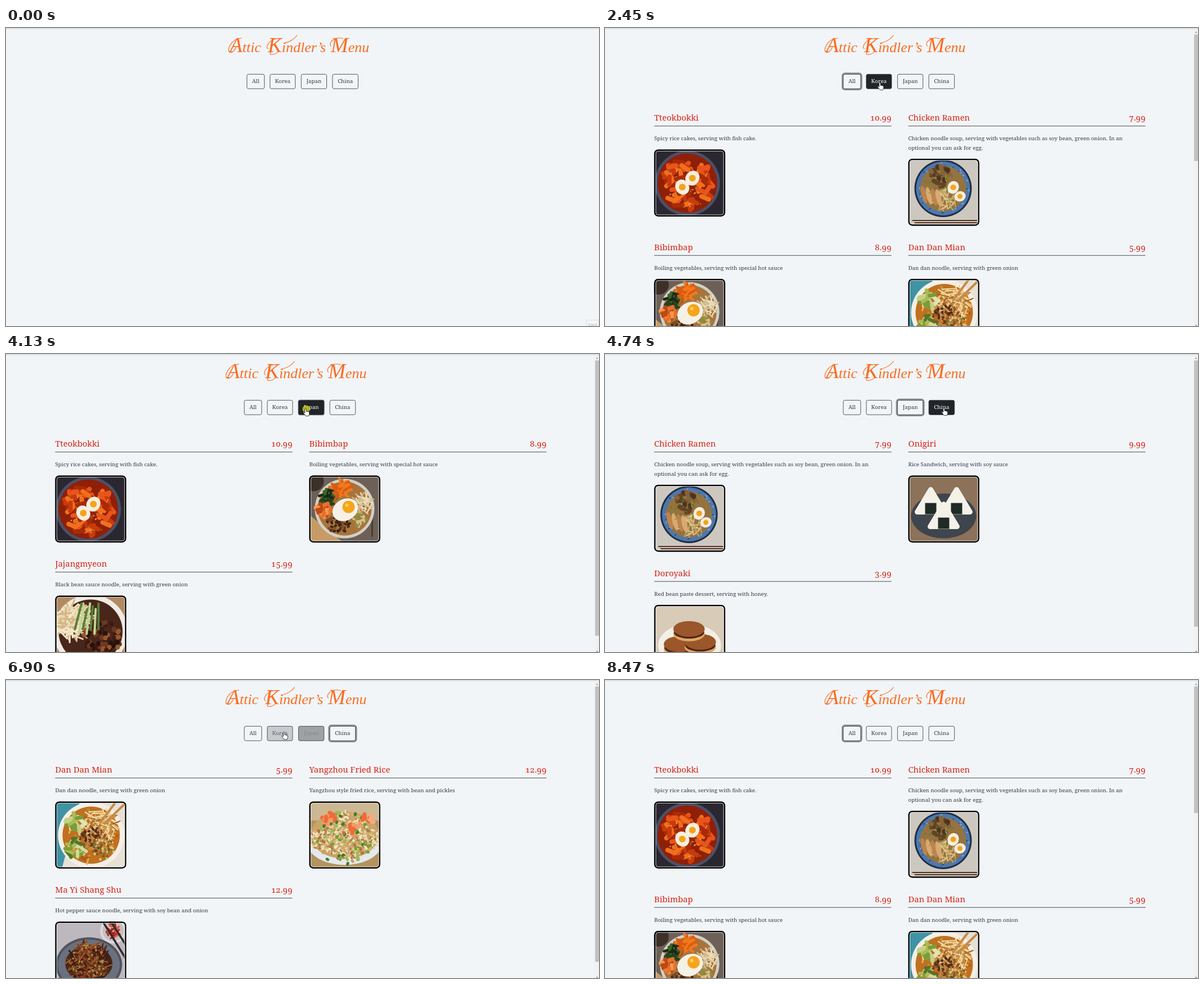
An HTML page that plays this animation: 1055x531 px, repeating every 9.4 s.

```html
<!DOCTYPE html>
<html lang="en">
<head>
<meta charset="utf-8">
<title>Menu filter</title>
<style>
  html, body { margin: 0; width: 100%; height: 100%; overflow: hidden; background: #f1f5f8; }
  svg { display: block; font-family: "Noto Serif", serif; font-size: 9.78px; fill: #363b40; }
  .title { font: italic 26px "Liberation Serif", serif; fill: #fc6b21; }
  .title .cap { font-size: 37px; }
  .swash { fill: none; stroke: #fc6b21; stroke-width: 1.2; stroke-linecap: round; }
  .name { font-size: 14.8px; fill: #da2013; }
  .price { text-anchor: end; font-variant-numeric: oldstyle-nums tabular-nums; }
  .button text { text-anchor: middle; }
</style>
</head>
<body>
<svg id="stage" width="1055" height="531" viewBox="0 0 1055 531"></svg>
<script>
const LOOP = 9400;
const stage = document.getElementById("stage");

// Shape helpers
let seed = 7;
const random = () => (seed = (seed * 16807) % 2147483647) / 2147483647;
const rect = (x, y, w, h, fill, extra = "") =>
  `<rect x="${x}" y="${y}" width="${w}" height="${h}" fill="${fill}" ${extra}/>`;
const oval = (x, y, rx, ry, fill, turn = 0) =>
  `<ellipse cx="${x}" cy="${y}" rx="${rx}" ry="${ry}" fill="${fill}" transform="rotate(${turn} ${x} ${y})"/>`;
const disc = (x, y, r, fill) => oval(x, y, r, r, fill);
const line = (d, color, width) =>
  `<path d="${d}" fill="none" stroke="${color}" stroke-width="${width}" stroke-linecap="round"/>`;
const egg = (x, y, r, turn = 0) => oval(x, y, r, r * 1.15, "#f8eee0", turn) + disc(x, y, r * .5, "#f3a41b");

// Small rounded pieces strewn over a round area
function bits(count, cx, cy, radius, w, h, colors) {
  let out = "";
  for (let i = 0; i < count; i++) {
    const a = random() * 6.283, d = Math.sqrt(random()) * radius;
    const x = (cx + Math.cos(a) * d).toFixed(1), y = (cy + Math.sin(a) * d).toFixed(1);
    out += rect(-w / 2, -h / 2, w, h, colors[i % colors.length],
      `rx="${Math.min(w, h) / 2}" transform="translate(${x} ${y}) rotate(${(random() * 180) | 0})"`);
  }
  return out;
}
const backdrop = color => rect(0, 0, 126, 119, color);

const photos = {
  tteokbokki: () => backdrop("#2b2730") + disc(59, 60, 58, "#4b5068") + disc(59, 60, 53, "#8f2008") +
    bits(62, 59, 60, 43, 22, 8, ["#e9541a", "#c93a0c", "#f0701e", "#a82a08"]) +
    bits(24, 59, 64, 42, 3, 2, ["#7e8a2c", "#f6a05a"]) + egg(50, 67, 12, -30) + egg(68, 51, 12, 35),
  ramen: () => backdrop("#cdc8bf") + disc(62, 53, 51, "#1f2c44") + disc(62, 53, 48, "#4d78ad") +
    bits(70, 62, 53, 46, 4, 2, ["#2a4c80", "#88a9cc"]) + disc(62, 53, 41, "#94733f") +
    bits(26, 58, 32, 20, 11, 8, ["#644326", "#8a6238", "#4b341f"]) +
    bits(36, 66, 74, 18, 16, 2, ["#dfc68d", "#c7a565"]) +
    [28, 37, 46, 54].map((x, i) => oval(x, 64 + i * 2, 4.5, 16, i % 2 ? "#d8aa72" : "#bd8450", -14)).join("") +
    bits(26, 58, 48, 32, 4, 2, ["#5b7a30", "#89a046"]) + egg(80, 51, 10, 20) + egg(92, 67, 9, 70) +
    line("M8 110H122M12 114H122", "#56301f", 2),
  bibimbap: () => backdrop("#6d6157") + `<path d="M0 70L60 119H0z" fill="#c79b66"/>` + disc(8, 10, 18, "#3c3029") +
    line("M112 44V108", "#4c3b30", 3) + disc(63, 59, 53, "#d2cfc6") + disc(63, 59, 48, "#a7743c") +
    bits(28, 34, 39, 14, 13, 5, ["#26431f", "#3e6128", "#172c17"]) +
    bits(24, 57, 25, 13, 22, 4, ["#f1791d", "#d85b10"]) +
    bits(22, 25, 62, 12, 13, 7, ["#e9702c", "#f39a4b", "#bd4a16"]) +
    bits(70, 52, 84, 20, 6, 4, ["#4a2a17", "#7d4a27", "#33200f"]) +
    bits(26, 96, 52, 14, 24, 2.5, ["#e9dbb7", "#cfb98a"]) +
    bits(22, 90, 80, 12, 8, 4, ["#8a9140", "#d6c08a"]) +
    oval(64, 61, 24, 19, "#f6f1e7", -30) + disc(70, 56, 11, "#f5a51c") + disc(67, 53, 3, "#ffd069"),
  dandan: () => backdrop("#e6e0d5") + `<path d="M0 0H44L12 119H0z" fill="#3f93a4"/>` +
    disc(64, 60, 59, "#f4efe6") + disc(64, 60, 51, "#c0701f") +
    bits(40, 60, 62, 44, 18, 3, ["#d98f3a", "#a95a1a", "#e3ad5c"]) +
    bits(120, 78, 46, 29, 26, 2, ["#edce8c", "#c78f45", "#f4dfab", "#a86a2c"]) +
    bits(20, 37, 38, 15, 16, 7, ["#a8bd55", "#dfe4b4", "#7d9b38", "#c5cf86"]) +
    bits(22, 36, 84, 16, 16, 6, ["#7f9e35", "#d3d99a", "#55752a", "#a9bb58"]) +
    bits(90, 67, 68, 23, 5, 4, ["#6a3a1c", "#925327", "#472713", "#c08a4a"]) +
    bits(40, 86, 84, 20, 5, 4, ["#e1c27d", "#70892f", "#8a5526"]) +
    line("M107 2L80 38M123 5L88 39", "#c78a47", 4),
  yangzhou: () => backdrop("#b3935f") + rect(0, 0, 126, 34, "#cdb894") + oval(63, 71, 68, 42, "#e3e9ee") +
    oval(63, 60, 61, 42, "#c9a56a") +
    bits(420, 63, 61, 43, 6, 3, ["#ead5a5", "#d4b473", "#f5e7c5", "#a98049"]) +
    [18, 108].map(x => bits(90, x, 67, 18, 6, 3, ["#ead5a5", "#d4b473", "#f5e7c5", "#a98049"])).join("") +
    bits(44, 62, 64, 50, 7, 5, ["#6fa535", "#96bd50", "#437c24"]) +
    bits(16, 60, 66, 46, 7, 5, ["#b5723f", "#d99a62"]) +
    bits(9, 36, 33, 12, 15, 7, ["#ef6b38", "#f79a68"]) + bits(7, 79, 44, 9, 15, 7, ["#ef6b38", "#f79a68"]) +
    bits(7, 103, 32, 9, 15, 7, ["#ef6b38", "#f9aa7c"]),
  onigiri: () => backdrop("#8c7259") + oval(63, 72, 58, 40, "#3f454c") +
    [[40, 50], [86, 50], [63, 76]].map(([x, y]) =>
      `<path d="M${x} ${y - 25}l24 40h-48z" fill="#f4f1e8" stroke="#f4f1e8" stroke-width="9" stroke-linejoin="round"/>` +
      rect(x - 10, y - 1, 20, 20, "#202b25")).join(""),
  jajang: () => backdrop("#b28a62") + disc(63, 64, 66, "#f0ebe2") + disc(63, 64, 57, "#49261a") +
    bits(110, 28, 45, 27, 36, 3, ["#e8d5af", "#d2b683", "#f3e7cb"]) +
    bits(80, 84, 75, 33, 9, 8, ["#3b1b12", "#6d3a20", "#26120d", "#99562c"]) +
    [0, 1, 2, 3, 4, 5, 6].map(i => line(`M${47 + i * 5} ${14 + i % 3 * 5}L${35 + i * 7} ${60 + i % 2 * 8}`,
      i % 2 ? "#c5d596" : "#56813a", 4)).join(""),
  mayi: () => backdrop("#bcb8be") + disc(103, 16, 23, "#dcdadc") + disc(103, 16, 19, "#c9bfbf") +
    bits(26, 103, 15, 13, 11, 3, ["#b92a24", "#dc5a40", "#8f1f1c"]) +
    oval(60, 77, 59, 49, "#4e535f") + oval(60, 77, 55, 45, "#6a707e") + oval(60, 75, 42, 32, "#462519") +
    bits(190, 60, 73, 35, 20, 2, ["#6c351c", "#a5612f", "#321a12", "#7e4320"]) +
    bits(50, 60, 70, 32, 4, 3, ["#c58440", "#8a9945", "#a83222"]) +
    line("M86 2L125 65M99 0L126 42", "#33292c", 3.5),
  doroyaki: () => backdrop("#d8cbb8") + oval(63, 72, 56, 38, "#f3efe7") +
    [[45, 72], [82, 68], [62, 45]].map(([x, y]) => oval(x, y + 7, 28, 13, "#dfa75e") +
      oval(x, y + 4, 27, 11, "#4b221c") + oval(x, y - 2, 28, 14, "#9b562a")).join("")
};

const dishes = [
  ["Korea", "Tteokbokki", "10.99", "tteokbokki", "Spicy rice cakes, serving with fish cake."],
  ["Japan", "Chicken Ramen", "7.99", "ramen",
    "Chicken noodle soup, serving with vegetables such as soy bean, green onion. In an", "optional you can ask for egg."],
  ["Korea", "Bibimbap", "8.99", "bibimbap", "Boiling vegetables, serving with special hot sauce"],
  ["China", "Dan Dan Mian", "5.99", "dandan", "Dan dan noodle, serving with green onion"],
  ["China", "Yangzhou Fried Rice", "12.99", "yangzhou", "Yangzhou style fried rice, serving with bean and pickles"],
  ["Japan", "Onigiri", "9.99", "onigiri", "Rice Sandwich, serving with soy sauce"],
  ["Korea", "Jajangmyeon", "15.99", "jajang", "Black bean sauce noodle, serving with green onion"],
  ["China", "Ma Yi Shang Shu", "12.99", "mayi", "Hot pepper sauce noodle, serving with soy bean and onion"],
  ["Japan", "Doroyaki", "3.99", "doroyaki", "Red bean paste dessert, serving with honey."]
];

function dishCard([, name, price, photo, ...text], x, y) {
  const top = 57 + 16.5 * (text.length - 1);
  return `<g transform="translate(${x} ${y})">
    <text class="name" y="5.5">${name}</text><text class="name price" x="422" y="5.5">${price}</text>
    ${rect(0, 14.8, 422, .8, "#212529")}
    ${text.map((s, i) => `<text y="${40.5 + i * 16.5}">${s}</text>`).join("")}
    <g transform="translate(0 ${top})"><use href="#${photo}" clip-path="url(#frame)"/>
    <rect x="1.2" y="1.2" width="124" height="117" rx="6" fill="none" stroke="#000" stroke-width="2.4"/>
    <rect x="2.9" y="2.9" width="120.6" height="113.6" rx="4" fill="none" stroke="#f1f5f8" stroke-width=".8"/></g></g>`;
}

function menu(kind, thumbEnd) {
  const list = dishes.filter(d => kind === "All" || d[0] === kind);
  let out = "", y = 159.5;
  for (let i = 0; i < list.length && y < 531; i += 2) {
    const row = list.slice(i, i + 2);
    row.forEach((d, col) => out += dishCard(d, 87.5 + col * 452, y));
    y += row.some(d => d.length > 5) ? 230.5 : 214;
  }
  return `<g id="menu${kind}">${out}${rect(1048, 2, 7, 529, "#f1f1f1")}
    ${rect(1048, 11.5, 7, thumbEnd - 11.5, "#c1c1c1")}
    <path d="M1049.8 8.5l1.8-2.2 1.8 2.2zM1049.8 529l1.8 2 1.8-2z" fill="#7c7c7c"/></g>`;
}

const buttons = [["All", 428.7, 31], ["Korea", 469.7, 45], ["Japan", 525.2, 45.3], ["China", 580.9, 45.6]];
const box = (x, w, extra) => `<rect x="${x}" y="82.4" width="${w}" height="25.8" rx="2.8" ${extra}/>`;

stage.innerHTML = `
  <defs><clipPath id="frame"><rect width="126" height="119" rx="7"/></clipPath>
  ${Object.entries(photos).map(([id, draw]) => `<g id="${id}">${draw()}</g>`).join("")}</defs>
  ${rect(0, 0, 1055, 531, "#f1f5f8")}${rect(0, .6, 1055, 1, "#c9cccf")}
  ${menu("All", 237)}${menu("Korea", 502)}${menu("Japan", 486)}${menu("China", 502)}
  <g id="head">
    <text class="title" y="42.5"><tspan class="cap" x="398">A</tspan>ttic<tspan class="cap" x="466">K</tspan>indler’s<tspan class="cap" x="578">M</tspan>enu</text>
    <path class="swash" d="M419 18C400 19 392 40 398 43C403 45 407 39 409 35M486 19C471 17 460 34 466 37M472 42C464 50 480 48 484 42M494 27Q510 24 518 13M600 19C584 14 573 27 578 32"/>
    ${buttons.map(([name, x, w], i) => `<g class="button">${box(x, w, `id="ring${i}" fill="none" stroke="#898d91"`)}
      ${box(x, w, `id="face${i}" stroke="#212529" stroke-width=".75"`)}
      <text id="label${i}" x="${x + w / 2}" y="98.3">${name}</text></g>`).join("")}
  </g>
  <g id="hint">${rect(1032.5, 520.5, 21, 14, "#f5f7f9", 'stroke="#d3d7da" stroke-width=".8"')}
    <text x="1036" y="531" style="font:7px Roboto,sans-serif;fill:#b9bdc1">Kayıt</text></g>
  <g id="cursor"><circle id="press" cx="1" cy="1" r="6.6" fill="#c9c514" fill-opacity=".85"/>
    <path id="hand" d="M-1.3 1.2c0-1.7 2.5-1.7 2.5 0v4l1.9.2 2 .5 1.6.8v3.6l-1.2 3.1h-5.3l-2.7-3.5-1.7-2.4c.1-1.3 1.7-1 2.9.6z" fill="#fff" stroke="#111" stroke-width=".8" stroke-linejoin="round"/>
    <path id="arrow" d="M0 0v11.5l2.7-2.5 1.8 4 1.7-.8-1.8-3.8h3.6z" fill="#fff" stroke="#111" stroke-width=".8"/></g>`;

const el = id => document.getElementById(id);
const show = (id, on) => el(id).style.display = on ? "" : "none";
const clamp = v => Math.max(0, Math.min(1, v));
const mix = (a, b, k) => `rgb(${a.map((v, i) => Math.round(v + (b[i] - v) * k))})`;
const LIGHT = [241, 245, 248], DARK = [33, 37, 41], INK = [54, 59, 64], WHITE = [255, 255, 255];

// [start, end, steps, x, y]
const moves = [
  [250, 1160, 14, 444.5, 102], [2100, 2450, 6, 489, 97], [3650, 3990, 6, 533, 97],
  [4400, 4740, 6, 603, 96], [6470, 7170, 11, 448, 91], [7980, 8470, 8, 985, 528]
];
// [button, press, release, focus, filter]
const clicks = [
  [0, 1230, 1360, 1290, 1430], [1, 2780, 2920, 2780, 2920], [2, 4060, 4200, 4060, 4200],
  [3, 5730, 5870, 5730, 5870], [0, 7240, 7380, 7310, 7380]
];

function pointer(t) {
  if (t < 250 || t >= 8470) return null;
  let x = 1020, y = 535;
  for (const [start, end, steps, toX, toY] of moves) {
    if (t < start) break;
    const p = clamp((Math.floor((t - start) / (end - start) * (steps - 1) + .001) + 1) / steps);
    const k = p * p * (3 - 2 * p);
    x += (toX - x) * k;
    y += (toY - y) * k;
  }
  return [x, y];
}
const shift = t => t < clicks[0][4] ? 0 : -4.8;

function hovered(t) {
  const at = pointer(t);
  return at && at[1] > 82 && at[1] < 108.5
    ? buttons.findIndex(([, x, w]) => at[0] > x + shift(t) && at[0] < x + w + shift(t)) : -1;
}

function draw(t) {
  const filter = clicks.filter(c => t >= c[4]).pop();
  const focus = clicks.filter(c => t >= c[3]).pop();
  el("head").setAttribute("transform", `translate(${shift(t)} 0)`);
  buttons.forEach(([name], i) => {
    show("menu" + name, filter && filter[0] === i);
    let dark = 0;
    for (let k = 0; k < 5; k++) dark += (hovered(t - k * 30) === i) / 5;
    el("face" + i).setAttribute("fill", mix(LIGHT, DARK, dark));
    el("label" + i).style.fill = mix(INK, WHITE, dark);
    const ring = focus && focus[0] === i ? clamp((t - focus[3]) / 140) : 0;
    el("ring" + i).setAttribute("stroke-width", ring * 5.6);
    el("ring" + i).setAttribute("stroke-opacity", ring);
  });
  show("hint", t < 70);
  const at = pointer(t);
  show("cursor", at);
  if (!at) return;
  el("cursor").setAttribute("transform", `translate(${at})`);
  show("hand", hovered(t) >= 0);
  show("arrow", hovered(t) < 0);
  show("press", clicks.some(c => t >= c[1] && t < c[2]));
}

function tick() {
  draw(performance.now() % LOOP);
  requestAnimationFrame(tick);
}
tick();
</script>
</body>
</html>
```
